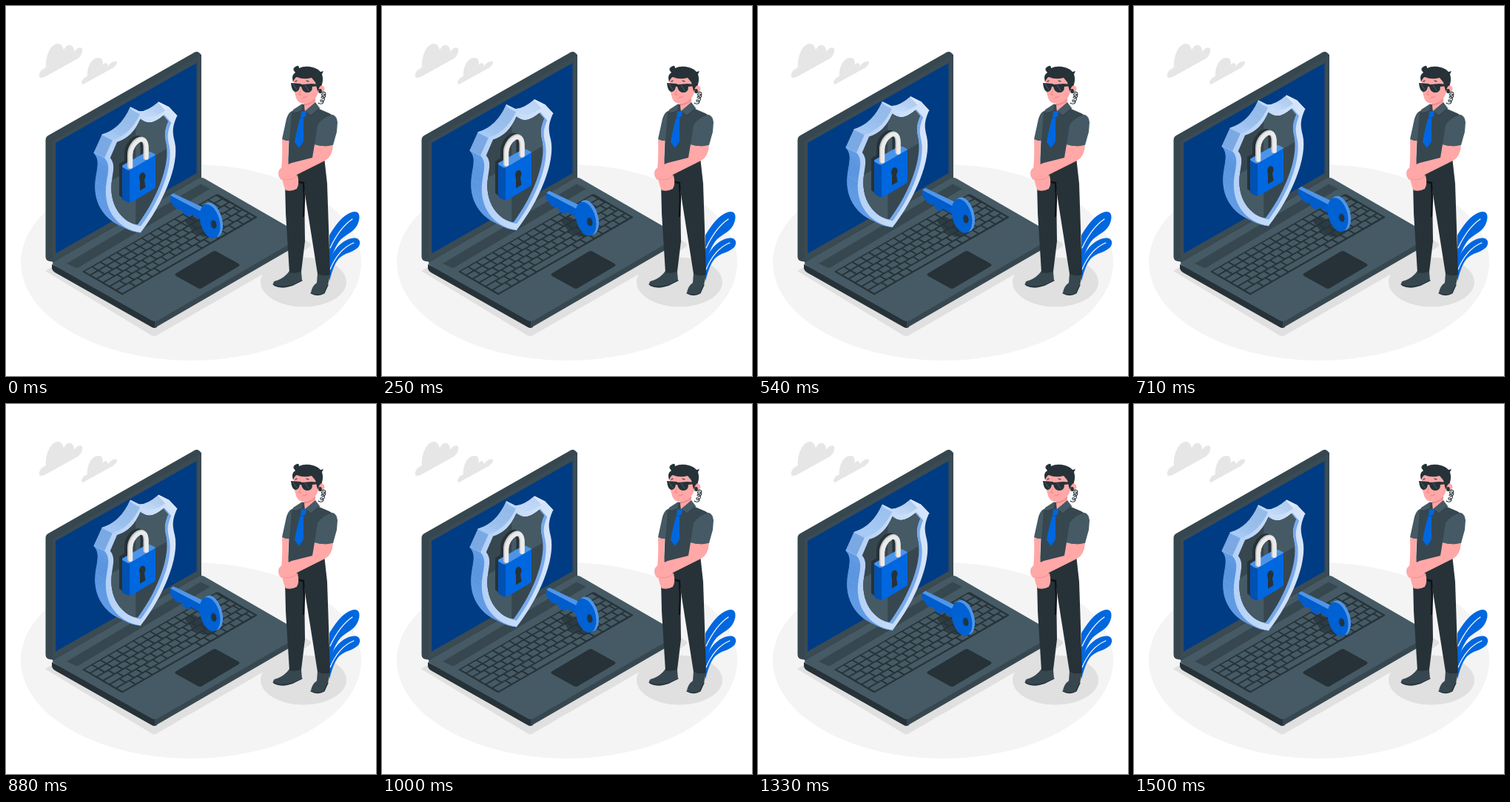
These frames come from a looping animation (500 by 500 pixels, 1.54 s). An HTML page with a canvas:

```html
<!DOCTYPE html>
<html lang="en">
<head>
<meta charset="utf-8">
<title>Laptop security</title>
<style>
html, body { margin: 0; width: 100%; height: 100%; overflow: hidden; background: #fff; }
canvas { display: block; width: 500px; height: 500px; }
</style>
</head>
<body>
<canvas id="stage"></canvas>
<script>
const LOOP = 1540, PERIOD = 1500, STEP = PERIOD / 36, LEAD = 60, RISE = 10, ISO = 0.577;
const BLUE = '#0067df', DARK = '#263238', SLATE = '#37474f', STEEL = '#455a64', SKIN = '#ffa8a7';
const canvas = document.getElementById('stage');
const ratio = window.devicePixelRatio || 1;
canvas.width = canvas.height = 500 * ratio;
const ctx = canvas.getContext('2d');
ctx.scale(ratio, ratio);
ctx.lineCap = ctx.lineJoin = 'round';

function fill(color, d) {
  ctx.fillStyle = color;
  ctx.fill(new Path2D(d));
}

function line(color, width, d) {
  ctx.strokeStyle = color;
  ctx.lineWidth = width;
  ctx.stroke(new Path2D(d));
}

function oval(color, x, y, rx, ry, turn = 0) {
  ctx.fillStyle = color;
  ctx.beginPath();
  ctx.ellipse(x, y, rx, ry, turn, 0, 7);
  ctx.fill();
}

function at(x, y, draw) {
  ctx.save();
  ctx.translate(x, y);
  draw();
  ctx.restore();
}

function drawGround() {
  ctx.fillStyle = '#fff';
  ctx.fillRect(0, 0, 500, 500);
  oval('#f4f4f4', 250, 346.5, 230, 132.5);
  fill('#e6e6e6', 'M48 97C43 98 44 90 49 86L54 83C53 68 60 51 70 51C75 51 77 55 78 60C80 54 85 51 89 54C92 56 92 59 92 62C95 57 101 54 103 58C104 63 101 68 97 71L52 96Z');
  fill('#e6e6e6', 'M104 106C100 105 103 97 110 95C109 84 115 70 125 70C130 70 131 74 131 80C133 76 137 76 138 81C142 75 149 73 150 76C150 80 146 83 142 85Z');
  fill('#e0e0e0', 'M53 358L198 446Q201 447 204 445L410 326Q415 322 409 319L262 234Z');
  oval('#e0e0e0', 402, 373, 58, 33.5);
}

function drawKeyboard() {
  fill(DARK, 'M103 359L284 254.5Q286 254 288 255L340 285.5L157 390.5Z');
  ctx.save();
  ctx.transform(1, -ISO, 1, ISO, 103, 359);
  ctx.fillStyle = STEEL;
  const pitch = 11.2, depth = 8.8, firstWidths = [1, 1, 1.4, 1.7, 1.2, 1.6];
  firstWidths.forEach((first, row) => {
    let x = 2;
    for (let col = 0; x < 179; col++) {
      const space = row === 5 && col === 4;
      const units = space ? 5 : col ? 1 : first;
      const w = Math.min(units * pitch, 182 - x);
      ctx.fillRect(x, 1.5 + row * depth, w - 1.9, depth - 1.9);
      x += w;
    }
  });
  ctx.restore();
  fill('rgba(38,50,56,.75)', 'M241 290L252 284L287 303L280 311L266 312L251 303Z');
}

function drawLaptop() {
  fill(SLATE, 'M58 342L264 224V240L70 352Z');
  fill(DARK, 'M62 349V355Q63 358 66 360L197 434Q200 436 204 434V420Z');
  fill(SLATE, 'M201 425V435L398 321Q401 319 401 310Z');
  fill(STEEL, 'M66 345L260 233Q264 231 268 233L398 308Q402 311 398 313L205 425Q201 427 197 425L64 350Q61 348 66 345Z');
  fill(SLATE, 'M82 348L263 240.5L276 247L96 354.5Z');
  drawKeyboard();
  fill(DARK, 'M230 361L279 332Q282 330 285 332L314 348Q317 350 314 352L265 381Q262 383 259 381L230 365Q227 363 230 361Z');

  fill(SLATE, 'M53.5 181Q53.5 177 57 175L255 62.5Q258 61 261 63L264 66V229L64 344.5Q60 346 56 344Q53.5 342 53.5 339Z');
  fill('#3b4b54', 'M62.5 186Q62.5 183 65 181.5L259 69Q264 66 264 71V226Q264 229 261 231L65 344Q62.5 345 62.5 341Z');
  fill('#003c83', 'M67 185L257.5 77V226L67 334.5Z');
}

// Shield outline seen head-on; the isometric skew is applied when drawing.
const shield = new Path2D('M0 144Q13 166 38 159L49 177C41 190 44 199 46 210C53 245 30 285 0 306C-30 285-53 245-46 210C-44 199-41 190-49 177L-38 159Q-13 166 0 144Z');
const shieldEdges = [
  ['#619be5', 'M-49 177C-41 190-44 199-46 210C-53 245-30 285 0 306'],
  ['#8ab6ee', 'M-49 177L-38 159'],
  ['#a8cbf6', 'M-38 159Q-13 166 0 144'],
  ['#c1d9f8', 'M0 144Q13 166 38 159'],
  ['#dae8fc', 'M38 159L49 177']
];

function onWall(x, y, draw) {
  at(x, y, () => {
    ctx.transform(1, -ISO, 0, 1, 0, 0);
    draw();
  });
}

function drawShield() {
  const middle = 182, steps = 28;
  for (const [color, d] of shieldEdges) {
    for (let i = steps; i >= 0; i--) {
      onWall(middle - 14 * i / steps, -7 * i / steps, () => line(color, 1, d));
    }
  }
  onWall(middle, 0, () => {
    const rim = ctx.createLinearGradient(-48, 0, 48, 0);
    rim.addColorStop(0, '#b4d0f6');
    rim.addColorStop(1, '#d6e6fb');
    ctx.fillStyle = rim;
    ctx.fill(shield);
    ctx.translate(0, 222);
    ctx.scale(.84, .9);
    ctx.translate(0, -222);
    ctx.fillStyle = '#78a9eb';
    ctx.fill(shield);
    ctx.clip(shield);
    ctx.translate(-5, -5);
    ctx.clip(shield);
    ctx.fillStyle = SLATE;
    ctx.fillRect(-70, 130, 140, 190);
    ctx.fillStyle = STEEL;
    ctx.fillRect(-3, 130, 73, 87);
    ctx.fillRect(-70, 217, 67, 103);
  });
}

function drawLock() {
  const shackle = 'M168.5 217V201C168.5 185 190 169 190 192V205';
  at(-5, -2, () => line(DARK, 7, shackle));
  fill(DARK, 'M153 213L160 209V262L153 256Z');
  fill('#0051b2', 'M157 217Q157 215 159 215L168 221V265Q165 266 162 264L158 262Q157 261 157 259Z');
  fill('#4b94ea', 'M158 215L190 197Q193 196 196 197.5L201 200Q203 201 200 203L168 221.5Q166 222.5 163 221L158 218Q156 216.5 158 215Z');
  fill(BLUE, 'M167 222L200 202.5Q202 201 202 204V244Q202 246 200 247L170 265Q167 266 167 263Z');
  at(-1, -.5, () => line('#c4c4c4', 7, shackle));
  line('#ebebeb', 5.5, shackle);
  fill(DARK, 'M181 236C178 228 184 223 187 226C190 229 188 233 187 235L188.5 245L181 249.5Z');
}

function drawKey() {
  fill('#4f96ea', 'M222 256L226 253L266 272L262 279Z');
  fill('#005dcb', 'M222 256L263 277.5V289L254 284L250 281L247 285L240 281L237 275Q233 276 229 273L222 264Z');
  oval('#4f96ea', 279, 289, 13, 24, -.27);
  oval('#0061d3', 275.5, 291, 13, 23.5, -.27);
  oval('#004692', 280.5, 295, 3.8, 6, -.2);
  oval(DARK, 281.3, 295.4, 2.9, 5, -.2);
}

function drawLeaves() {
  fill(BLUE, 'M437 348V310C445 296 457 280 470 278C478 277 479 285 476 293C472 305 460 308 452 316C445 324 441 336 437 348Z');
  line('#fff', 1.2, 'M438 327C446 310 456 296 468 288');
  fill(BLUE, 'M437 372V345C443 328 455 315 470 313.5C479 313 480 321 476 326C468 334 458 333 450 341C443 349 440 361 437 372Z');
  line('#fff', 1.2, 'M438 356C445 339 455 326 470 320');
}

function drawLegs() {
  fill(SLATE, 'M383 358L399 359L400 371L388 377Q374 384 362 378Q359 372 366 371Q377 367 383 358Z');
  fill(SLATE, 'M421 361L438 363L435 377L430 388Q420 394 412 388Q413 379 420 374Z');
  line(DARK, 1.3, 'M361 376Q370 382 388 377L400 371M412 388Q421 393 430 388L435 377');
  fill(DARK, 'M377 238L378 280L383 360Q391 362 399 359L404 318L403 248L421 362Q430 366 438 363L436 300L434 240L430 204L389 224Z');
  line('#0d1215', 2.3, 'M396 238L402 239L403 260L402 284');
}

function drawTorso() {
  fill(SLATE, 'M399 133L384 144L381 215L393 226L431 207L445 150L437 145L423 139L415 132Z');
  fill(STEEL, 'M386 142Q380 145 378 157L373 180Q378 183 383 182L385 158Z');
  fill(SKIN, 'M373 180Q378 183 382 182L381 205L382 218L372 222Q374 200 373 180Z');
  fill(SKIN, 'M417 187Q430 191 442 188Q441 204 431 209L395 227L380 236Q368 237 368 226Q368 220 375 217L386 212L414 205Z');
  fill(SKIN, 'M373 232Q375 244 378 249Q386 251 393 247Q397 240 394 229Q384 225 376 230Z');
  line('#ee8f8f', .8, 'M375 234Q384 237 394 230');
  fill(STEEL, 'M421 161Q428 150 442 147Q447 149 448 157L447 170L442 188Q429 191 417 187Z');
  fill(SKIN, 'M402 126L418 119L418 133L404 143Z');
  fill('#ee8f8f', 'M403 131Q413 129 418 122V128Q411 134 403 135Z');
  fill(STEEL, 'M401 132L399 142L390 145L388 140ZM418 130L424 138L412 148L404 142Z');
  line(DARK, .6, 'M399 142L390 145M424 138L412 148L404 142');
  fill(BLUE, 'M399 142L406 143L405 148L402 152L402 183L396 192L390 184Q393 165 398 151Z');
  line('#0051b2', .8, 'M398 151L403 151');
}

function drawHead() {
  fill(SKIN, 'M389 96L421 95L423 112Q421 128 406 132Q395 133 392 124L389 113Z');
  fill(DARK, 'M388 103Q385 93 391 90Q385 84 393 81Q396 80 396 84Q404 80 415 83Q422 85 425 89L429 88L427 92Q430 101 425 111L421 115L418 103L413 97Q402 100 393 96Q390 97 388 103Z');
  oval(SKIN, 426.5, 112.5, 3.8, 5, .2);
  line(DARK, 1.2, 'M391 102L393 101M406 101L409 102');
  fill(DARK, 'M385 104L398 105L400 106L413 105L424 106V108L414 109Q414 117 407 117Q401 117 399 109L397 109Q396 116 391 116Q386 115 385 104Z');
  line(STEEL, 1.1, 'M388 106L393 113M404 107L409 114');
  line('#ee7f83', 1, 'M398 115L396 120L399 120M401 124Q404 124 407 122');
  oval(DARK, 424.5, 115, 2.3, 3);
  line(DARK, 1.1, 'M426 117Q432 115 432 119Q431 122 427 121Q425 118 430 119Q434 123 428 125Q424 123 428 122Q433 126 428 129Q424 130 425 127Q428 126 429 130Q427 134 422 131');
}

// Steady rise and fall, held for one step at a time.
function floatHeight(time) {
  const held = Math.min(36, Math.floor((time % LOOP + 5) / STEP)) * STEP;
  const phase = (held + LEAD) / PERIOD % 1;
  return RISE * (1 - Math.abs(1 - 2 * phase));
}

const restOffset = floatHeight(0);

function frame(now) {
  drawGround();
  drawLaptop();
  at(0, restOffset - floatHeight(now), () => {
    drawShield();
    drawLock();
    drawKey();
  });
  drawLeaves();
  drawLegs();
  drawTorso();
  drawHead();
  requestAnimationFrame(frame);
}

frame(0);
</script>
</body>
</html>
```
